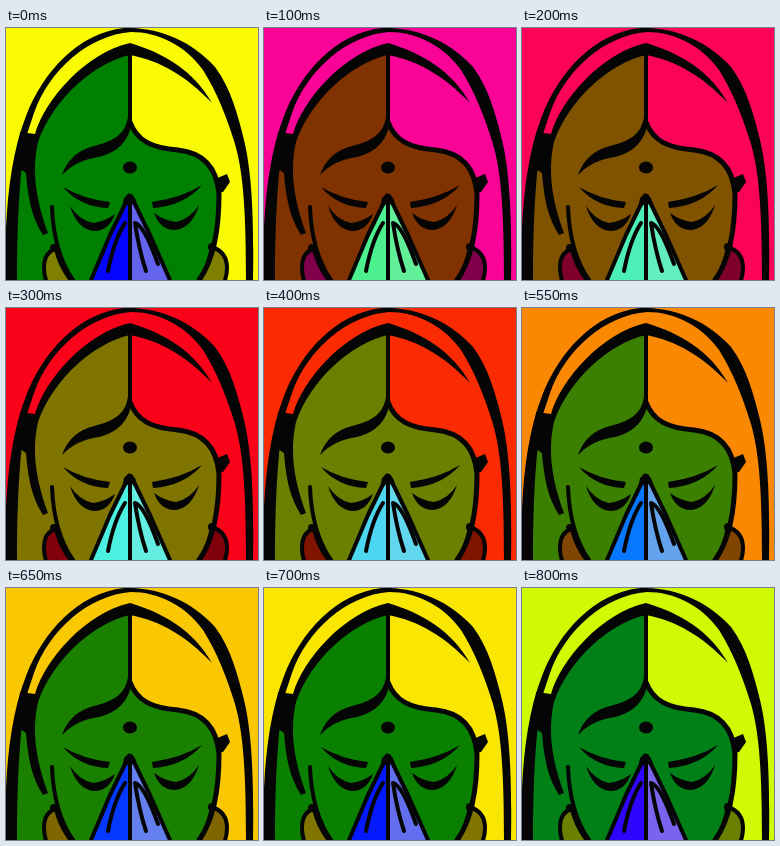
An HTML page that plays this animation: 252 px wide and 252 px high, repeating every 0.85 s.

```html
<!DOCTYPE html>
<html lang="en">
<head>
<meta charset="utf-8">
<style>
  html, body { margin: 0; width: 100%; height: 100%; overflow: hidden; }
  svg { display: block; width: 100vw; height: 100vh; }
  .backdrop { fill: var(--backdrop); }
  .skin { fill: var(--skin); }
  .earring { fill: var(--earring); stroke: #050505; stroke-width: 4; }
  .left-hand { fill: var(--left-hand); }
  .right-hand { fill: var(--right-hand); }
  .ink { fill: #050505; }
  .line { fill: none; stroke: #050505; stroke-width: 4; stroke-linecap: round; stroke-linejoin: round; }
  .contour { stroke-width: 5; }
</style>
</head>
<body>
<svg id="portrait" viewBox="0 0 252 252">
  <rect class="backdrop" width="252" height="252"/>

  <!-- hair and face -->
  <path class="skin" d="M124 22C88 30 46 64 30 112L14 140Q8 190 7 252H193C207 233 213 205 213 166C212 142 200 125 172 122C146 120 131 112 124 92Z"/>

  <!-- earrings -->
  <path class="earring" d="M50 221Q38 224 38 240Q38 248 41 255H67Q54 239 50 221Z"/>
  <path class="earring" d="M206 219Q221 224 221 240Q221 248 218 255H192Q202 240 206 219Z"/>

  <!-- veil -->
  <path class="ink" d="M0 252V200C2 160 7 121 20 88C37 44 72 5 118 0C150 -1 184 11 209 39C225 60 232 88 238 112C246 145 248 190 247 252H240C240 190 238 147 229 116C221 90 211 64 197 42C179 17 152 4 125 4C83 7 43 42 28 85L21 106C16 125 11 175 11 252Z"/>
  <path class="ink" d="M124 15C158 25 188 43 206 75C180 48 155 33 124 27C88 35 47 71 32 114C25 145 31 175 42 205L37 207C26 190 22 171 20 145L11 139L14 104L29 106C39 71 80 25 124 15Z"/>

  <!-- parting and contour -->
  <path class="line" d="M124 25V94M46 179C47 205 53 232 67 252"/>
  <path class="line contour" d="M124 94C131 113 146 120 172 122C200 125 211 142 213 166C213 205 207 233 193 252"/>
  <path class="ink" d="M122 88C120 106 108 113 88 118Q64 124 56 147Q70 132 93 129C113 124 122 112 125 98Z"/>
  <path class="ink" d="M209 151L221 146L224 154L217 164L211 165Z"/>
  <circle class="ink" cx="48" cy="220" r="4"/>
  <circle class="ink" cx="206" cy="219" r="4"/>

  <!-- brow mark and eyes -->
  <ellipse class="ink" cx="124" cy="139.500" rx="7" ry="6"/>
  <path class="ink" d="M57 159Q77 171 104 174L102 180Q74 179 57 159Z"/>
  <path class="ink" d="M196 157Q175 170 146 174L147 180Q178 178 196 157Z"/>
  <path id="lid" class="ink" d="M64 178Q73 192 87 195Q98 194 109 186Q103 203 88 203Q71 201 64 178Z"/>
  <use href="#lid" transform="translate(257 -1) scale(-1 1)"/>

  <!-- joined hands -->
  <path class="left-hand" d="M123 168L104 207L85 253H124Z"/>
  <path class="right-hand" d="M124 168L144 207L164 253H124Z"/>
  <path class="line" d="M123 168L104 207L85 252M125 168L144 207L164 252M124 168V252"/>
  <path class="line" d="M119 195Q108 212 102 243M129 195Q133 222 140 243M129 195Q138 197 152 236"/>
  <path class="ink" d="M118 170L123 165L129 170L132 179L124 175L116 181Z"/>
</svg>
<script>
  const LOOP = 850, HOLD = 100, STEP = 50;
  const style = document.getElementById("portrait").style;
  const paint = (name, hue, saturation, lightness) =>
    style.setProperty("--" + name, `hsl(${hue}, ${saturation}%, ${lightness}%)`);

  // The opening yellow holds, then the hue jumps back and climbs in equal steps.
  const hueAt = time => time < HOLD ? 60 : -36 + 7.6 * Math.floor((time - HOLD) / STEP);

  function draw() {
    const hue = hueAt(performance.now() % LOOP);
    const deepBlue = hue > 25;
    paint("backdrop", hue, 98, 49.5);
    paint("skin", hue + 60, 100, 25);
    paint("earring", hue, 100, 25);
    paint("left-hand", hue + 180, deepBlue ? 100 : 85, deepBlue ? 51 : 62);
    paint("right-hand", hue + 180, 80, 66);
    requestAnimationFrame(draw);
  }
  draw();
</script>
</body>
</html>
```
